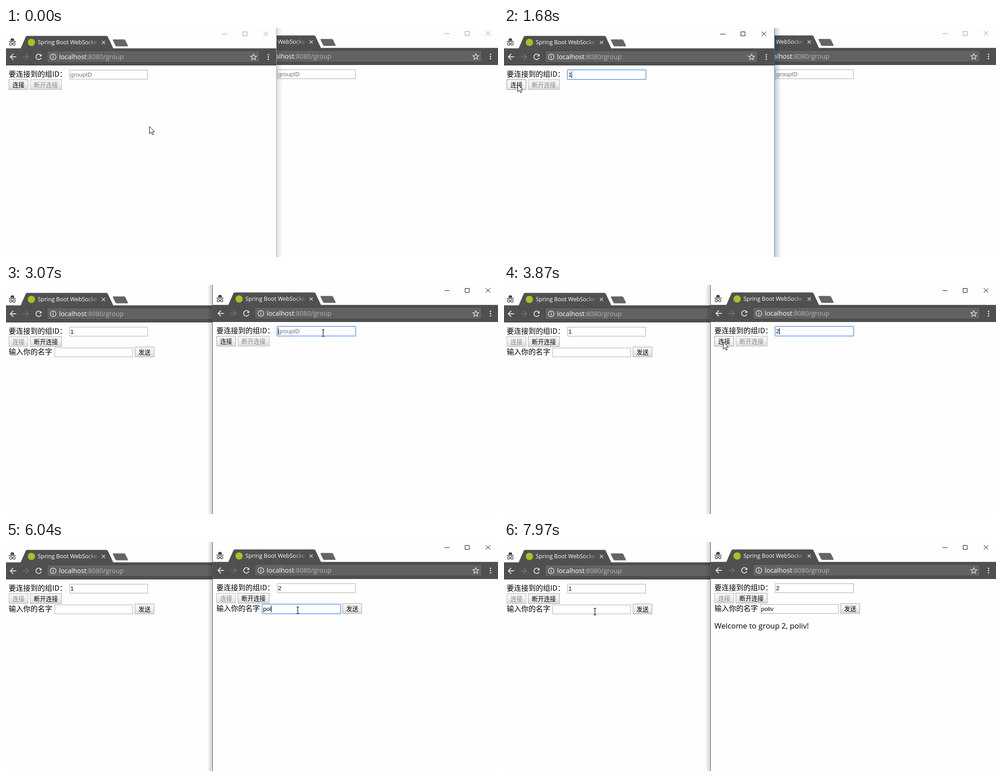
An HTML page that plays this animation: 1085 by 508 pixels, repeating every 8 s.

```html
<!DOCTYPE html>
<html lang="zh-CN">
<head>
<meta charset="utf-8">
<title>Group chat demo</title>
<style>
html, body { margin: 0; width: 100%; height: 100%; overflow: hidden; background: #fff; }
svg { display: block; }
text { white-space: pre; }
.url { font: 14.45px "Open Sans", sans-serif; fill: #b4b4b4; }
.url tspan { fill: #fff; }
.title { font: 12.5px "Open Sans", sans-serif; }
.label { font: 16px "Noto Sans CJK SC", "Noto Sans CJK", sans-serif; fill: #000; }
.msg { font: 16.85px "Open Sans", sans-serif; fill: #000; }
.btn text { font: 13.33px "Noto Sans CJK SC", "Noto Sans CJK", sans-serif; text-anchor: middle; fill: #000; }
.btn rect { fill: url(#face); stroke: #a5a5a5; }
.btn.hover rect { fill: url(#faceHover); stroke: #8a8a8a; }
.btn.off text { fill: #8a8a8a; }
.btn.off rect { fill: url(#face); stroke: #b8b8b8; }
.field text { font: 13.33px "Liberation Sans", Arial, sans-serif; fill: #000; }
.field .hint { fill: #757575; }
.field .box { fill: #fff; stroke: #a9a9a9; }
.field .ring { fill: none; stroke: #5c97ee; visibility: hidden; }
.field.focus .ring { visibility: visible; }
.field.focus .box { stroke: #a3c3f5; }
.controls { fill: none; stroke: #999; }
.edge { fill: none; stroke: #a0a0a0; }
.shade { opacity: .55; }
.active .controls { stroke: #000; }
.active .edge { stroke: #1883d7; }
.active .edge.l { stroke: #5c5c5c; }
.active .shade { opacity: 1; }
</style>
</head>
<body>
<svg id="stage" width="1085" height="508" viewBox="0 0 1085 508">
  <defs>
    <linearGradient id="face" x2="0" y2="1">
      <stop offset=".35" stop-color="#f4f4f4"/><stop offset="1" stop-color="#dcdcdc"/>
    </linearGradient>
    <linearGradient id="faceHover" x2="0" y2="1">
      <stop offset=".35" stop-color="#fafafa"/><stop offset="1" stop-color="#e6e6e6"/>
    </linearGradient>
    <linearGradient id="fade" gradientUnits="userSpaceOnUse" x1="176" x2="204" y1="0" y2="0">
      <stop stop-color="#fff"/><stop offset="1" stop-color="#fff" stop-opacity=".1"/>
    </linearGradient>
    <linearGradient id="shadeR">
      <stop stop-opacity=".2"/><stop offset="1" stop-opacity="0"/>
    </linearGradient>
    <linearGradient id="shadeL">
      <stop stop-opacity="0"/><stop offset="1" stop-opacity=".18"/>
    </linearGradient>
  </defs>
  <g id="cursor">
    <path id="arrow" d="M.5 .5V16.5L4.2 13L6.6 18.6L9.2 17.5L6.8 12H11.8Z" fill="#fff" stroke="#000"/>
    <path id="beam" d="M-3 -7.5H-1L0 -6.5L1 -7.5H3M0 -6.5V6.5M-3 7.5H-1L0 6.5L1 7.5H3" transform="translate(.5 .5)" fill="none" stroke="#000" stroke-width="1.2"/>
  </g>
</svg>
<script>
const LOOP = 8000, USER = 'poliv';
const stage = document.getElementById('stage');
const cursor = document.getElementById('cursor');
const arrow = document.getElementById('arrow');
const beam = document.getElementById('beam');
const show = (el, on) => el.setAttribute('visibility', on ? 'visible' : 'hidden');

const FIELDS = { id: [140, 93, 173, 21], name: [107, 139, 173, 21] };
const BUTTONS = { join: [6, 114, 43, 23], leave: [53, 114, 70, 23], send: [284, 137, 43, 23] };

const rect = ([x, y, w, h], cls, grow = 0) =>
  `<rect class="${cls}" x="${x + .5 - grow}" y="${y + .5 - grow}" width="${w - 1 + 2 * grow}" height="${h - 1 + 2 * grow}" rx="${grow}"/>`;

const field = (key, hint) => {
  const b = FIELDS[key], [x, y] = b;
  return `<g class="field ${key}">${rect(b, 'box')}${rect(b, 'ring', 1)}
    <text class="hint" x="${x + 2}" y="${y + 15}">${hint}</text>
    <text class="value" x="${x + 2}" y="${y + 15}"></text>
    <path class="caret" d="M${x + 2.5} ${y + 3}v15" stroke="#000"/></g>`;
};

const button = (key, label) => {
  const b = BUTTONS[key];
  return `<g class="btn ${key}">${rect(b, '')}<text x="${b[0] + b[2] / 2}" y="${b[1] + 17}">${label}</text></g>`;
};

// One browser window; w is the distance to its right edge.
const markup = w => `
  <rect class="shade" x="-14" width="11" height="510" fill="url(#shadeL)"/>
  <rect class="shade" x="${w}" width="14" height="510" fill="url(#shadeR)"/>
  <rect x="-3" width="${w + 3}" height="510" fill="#fefefe"/>
  <path d="M-3 45.5H${w}V82.5H-3Z" fill="#505050"/>
  <path d="M-3 82.5H${w}" stroke="#3c3c3c"/>
  <path d="M-3 45.5H32M237 45.5H${w}" stroke="#6a6a6a"/>
  <path d="M32 46C36 43 40 18 46 17.5H222C227 18 232 43 238 46Z" fill="none"/>
  <path d="M32 46L43.5 19.5Q44.5 17.5 47 17.5H221Q223.5 17.5 224.5 19.5L237 46Z" fill="#505050"/>
  <path d="M237 25.5Q235 25.5 236 27.5L241.500 39Q242.500 40.500 244 40.500H267Q269.500 40.500 268.500 38.500L263 27Q262 25.500 260.500 25.500Z" fill="#646464" stroke="#8c8c8c" stroke-width=".7"/>
  <g fill="#404040">
    <path d="M9.500 28.500L11 23.500Q11.500 22.500 14 23.300Q16.500 22.500 17 23.500L18.500 28.500ZM6 29.500H22V31H6Z"/>
    <g fill="none" stroke="#404040" stroke-width="1.300"><circle cx="10.300" cy="35.500" r="2.700"/><circle cx="17.700" cy="35.500" r="2.700"/><path d="M13 35Q14 34.300 15 35"/></g>
  </g>
  <circle cx="56" cy="32" r="8" fill="#a2c424"/>
  <text class="title" x="70" y="36" fill="url(#fade)">Spring Boot WebSocke</text>
  <path d="M211.500 28.500l7 7m0-7l-7 7" stroke="#d0d0d0" stroke-width="1.500"/>
  <g fill="none" stroke="#e2e2e2" stroke-width="1.900">
    <path d="M22.500 64H10M16 57.500L9.500 64L16 70.500"/>
    <path d="M37 64H49.500M43.500 57.500L50 64L43.500 70.500" stroke="#6e6e6e"/>
    <path d="M76.600 60A6 6 0 1 0 77.600 66.200"/><path d="M78.500 57.500V63H73Z" fill="#e2e2e2" stroke="none"/>
  </g>
  <rect x="90.500" y="50.500" width="${w - 128}" height="26" rx="2.500" fill="#626262" stroke="#3f3f3f"/>
  <circle cx="104" cy="64" r="6.300" fill="none" stroke="#e2e2e2" stroke-width="1.500"/>
  <path d="M104 63V67.500M104 60.200V61.900" stroke="#e2e2e2" stroke-width="1.600"/>
  <text class="url" x="117" y="69"><tspan>localhost</tspan>:8080/group</text>
  <path transform="translate(${w - 51} 64.500)" d="M0-6.500L1.900-2.200L6.500-1.900L3 1.200L4.100 5.800L0 3.300L-4.100 5.800L-3 1.200L-6.500-1.900L-1.900-2.200Z" fill="none" stroke="#e2e2e2" stroke-width="1.400"/>
  <g fill="#e2e2e2">${[59, 64, 69].map(y => `<circle cx="${w - 18.5}" cy="${y + .3}" r="1.600"/>`).join('')}</g>
  <g class="controls" transform="translate(${w} 0)">
    <path d="M-120 13.500h11M-74.500 8.500h9v9h-9ZM-29 8l10 10m0-10l-10 10"/>
  </g>
  <text class="label" x="6" y="108">要连接到的组ID：</text>
  ${field('id', 'groupID')}${button('join', '连接')}${button('leave', '断开连接')}
  <g class="chat"><text class="label" x="6" y="154">输入你的名字</text>
  ${field('name', '')}${button('send', '发送')}</g>
  <text class="msg" x="6" y="193"></text>
  <path class="edge l" d="M-2.500 0V510"/>
  <path class="edge" d="M${w - .5} 0V510"/>`;

function makeWindow(x, y, w) {
  const g = document.createElementNS('http://www.w3.org/2000/svg', 'g');
  g.setAttribute('transform', `translate(${x} ${y})`);
  g.innerHTML = markup(w);
  stage.insertBefore(g, cursor);
  return { g, x, y, $: s => g.querySelector(s) };
}
const right = makeWindow(458, -1, 629);
const left = makeWindow(0, 0, 597);

// Screen updates: first time, last time, number of steps.
const BURSTS = [[0, 0, 1], [120, 1080, 8], [1230, 2220, 8], [2370, 3330, 8], [3480, 3870, 4],
  [4140, 4800, 6], [5330, 5330, 1], [5610, 5610, 1], [5890, 6200, 3], [6730, 7700, 8], [7820, 7970, 2]];

function lastUpdate(t) {
  const [a, b, n] = BURSTS.findLast(s => s[0] <= t);
  if (t >= b) return b;
  const step = (b - a) / (n - 1);
  return a + Math.floor((t - a) / step) * step;
}

// Pointer waypoints: time, x, y.
const PATH = [[0, 316, 218], [670, 263, 109], [1090, 263, 109], [1660, 30, 125], [1800, 30, 125],
  [2220, 709, 258], [2700, 699, 106], [3200, 699, 106], [3330, 690, 109], [3870, 483, 126], [4140, 483, 127],
  [4404, 560, 174], [4668, 643, 151], [6600, 643, 151], [7146, 726, 145], [7285, 758, 150],
  [7423, 758, 150], [7700, 563, 212], [7820, 400, 222], [7970, 200, 154]];

function pointer(t) {
  const i = PATH.findIndex(p => p[0] > t);
  if (i < 0) return PATH.at(-1).slice(1);
  const [a, ax, ay] = PATH[i - 1], [b, bx, by] = PATH[i];
  const k = (t - a) / (b - a), e = k * k * (3 - 2 * k);
  return [Math.round(ax + (bx - ax) * e), Math.round(ay + (by - ay) * e)];
}

const during = (t, a, b) => t >= a && t < b;
const inside = ([x, y, w, h], px, py) => px >= x && px < x + w && py >= y && py < y + h;

function setField(win, key, value, focus, sinceInput) {
  const el = win.$('.field.' + key), text = el.querySelector('.value'), caret = el.querySelector('.caret');
  el.classList.toggle('focus', focus);
  text.textContent = value;
  el.querySelector('.hint').style.display = value ? 'none' : '';
  caret.style.display = focus && sinceInput % 1060 < 530 ? '' : 'none';
  caret.setAttribute('transform', `translate(${value ? Math.round(text.getComputedTextLength()) : 0} 0)`);
}

function setWindow(win, s, px, py) {
  const lx = px - win.x, ly = py - win.y;
  win.g.classList.toggle('active', s.active);
  setField(win, 'id', s.id, s.focus === 'id', s.sinceInput);
  setField(win, 'name', s.name, s.focus === 'name', s.sinceInput);
  win.$('.chat').style.display = s.joined ? '' : 'none';
  win.$('.msg').textContent = s.msg;
  for (const key in BUTTONS)
    win.$('.btn.' + key).classList.toggle('hover', s.active && inside(BUTTONS[key], lx, ly));
  win.$('.join').classList.toggle('off', s.joined);
  win.$('.leave').classList.toggle('off', !s.joined);
  return inside(FIELDS.id, lx, ly) || s.joined && inside(FIELDS.name, lx, ly);
}

function render(now) {
  const t = lastUpdate(now);
  const [x, y] = pointer(t);
  const rightOnTop = t >= 2780;
  const since = (...times) => now - (times.findLast(v => v <= t) ?? 0);
  const typed = [5610, 5610, 5890, 6040, 6200].filter(v => v <= t).length;

  const front = rightOnTop ? right : left;
  if (cursor.previousElementSibling !== front.g) stage.insertBefore(front.g, cursor);

  const overLeft = setWindow(left, {
    active: during(t, 800, 2780), id: t >= 1230 ? '1' : '', name: '', msg: '',
    focus: during(t, 800, 1790) ? 'id' : '', joined: t >= 1790, sinceInput: since(800, 1230)
  }, x, y);
  const overRight = setWindow(right, {
    active: rightOnTop, id: t >= 3480 ? '2' : '', name: USER.slice(0, typed),
    focus: during(t, 2780, 4140) ? 'id' : during(t, 4800, 7420) ? 'name' : '',
    joined: t >= 4140, msg: t >= 7420 ? `Welcome to group 2, ${USER}!` : '',
    sinceInput: t - ([2780, 3480, 4800, 5610, 5890, 6040, 6200].findLast(v => v <= t) ?? 0)
  }, x, y);

  const text = x < (rightOnTop ? 455 : 597) ? overLeft : overRight;
  show(beam, text);
  show(arrow, !text);
  cursor.setAttribute('transform', `translate(${x} ${y})`);
}

const start = performance.now();
function frame() {
  render((performance.now() - start) % LOOP);
  requestAnimationFrame(frame);
}
frame();
</script>
</body>
</html>
```
